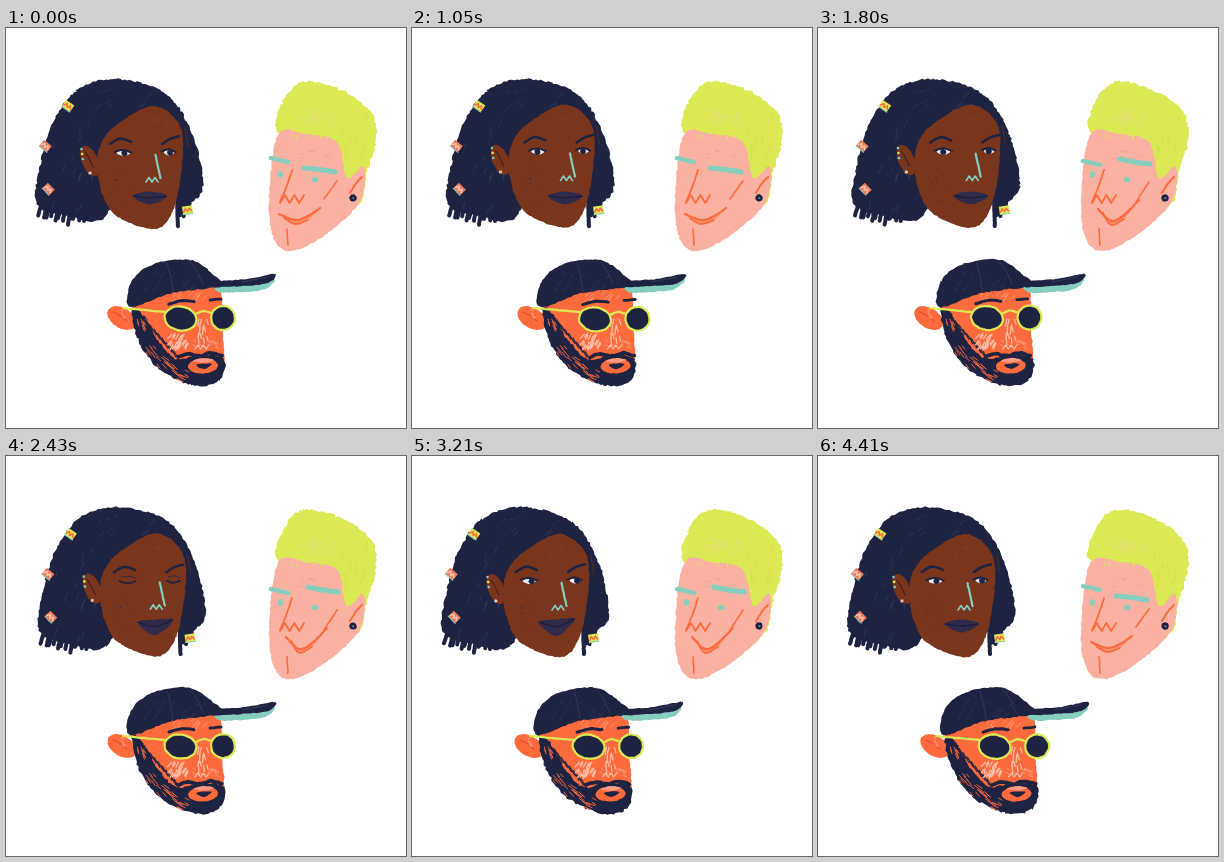
Recreate the animation shown at these times as an HTML page with a canvas. Size 400x400 px, loop 4500 ms.

```html
<!DOCTYPE html>
<html lang="en">
<head>
<meta charset="utf-8">
<title>Three portraits</title>
<style>
html, body { margin: 0; width: 100%; height: 100%; overflow: hidden; background: #fff; }
canvas { display: block; width: 400px; height: 400px; }
</style>
</head>
<body>
<canvas id="stage" width="400" height="400"></canvas>
<script>
const ctx = document.getElementById('stage').getContext('2d');
const LOOP = 4500, STEP = 30, BOIL = 125;
const navy = '#1f2342', brown = '#79361c', lip = '#302b4a', teal = '#85cdbd',
      lime = '#dbe955', pink = '#fbb1a2', orange = '#fd6a3c', blush = '#ffbda6',
      sheen = '#3b4463', rust = '#6a2c18';

let seed = 1, boil = 0, shapeId = 0;
const rnd = () => {
  seed = (seed + 0x6D2B79F5) | 0;
  let x = Math.imul(seed ^ (seed >>> 15), 1 | seed);
  x ^= x + Math.imul(x ^ (x >>> 7), 61 | x);
  return ((x ^ (x >>> 14)) >>> 0) / 4294967296;
};
const spread = a => (rnd() * 2 - 1) * a;
const mix = (a, b, k) => a + (b - a) * k;

// Eased value through [time, value] stops
function key(t, ...stops) {
  const i = stops.findIndex(s => s[0] > t);
  if (i < 0) return stops[stops.length - 1][1];
  if (i === 0) return stops[0][1];
  const [t0, a] = stops[i - 1], [t1, b] = stops[i], u = (t - t0) / (t1 - t0);
  return mix(a, b, u * u * (3 - 2 * u));
}

// Smooth path through the points, with a hand-drawn wobble
function trace(p, closed, rough) {
  seed = ++shapeId * 977 + boil * 7919;
  const n = p.length, last = closed ? n : n - 1;
  const at = i => p[closed ? (i + n) % n : Math.max(0, Math.min(n - 1, i))];
  ctx.beginPath();
  for (let i = 0; i < last; i++) {
    const [a, b, c, d] = [at(i - 1), at(i), at(i + 1), at(i + 2)];
    const m = Math.max(2, Math.round(Math.hypot(c[0] - b[0], c[1] - b[1]) / 2.5));
    for (let j = 0; j <= m; j++) {
      const u = j / m;
      const f = k => 0.5 * (2 * b[k] + (c[k] - a[k]) * u +
        (2 * a[k] - 5 * b[k] + 4 * c[k] - d[k]) * u * u +
        (3 * b[k] - a[k] - 3 * c[k] + d[k]) * u * u * u);
      ctx.lineTo(f(0) + spread(rough), f(1) + spread(rough));
    }
  }
  if (closed) ctx.closePath();
}
function fill(p, color, rough = 0.6) {
  trace(p, true, rough);
  ctx.fillStyle = color;
  ctx.fill();
}
function line(p, color, width = 2, rough = 0.2) {
  trace(p, false, rough);
  ctx.strokeStyle = color;
  ctx.lineWidth = width;
  ctx.stroke();
}
// Arc between two ends; bend pushes the middle down
const curve = (x0, y0, x1, y1, bend, color, width) =>
  line([[x0, y0], [(x0 + x1) / 2, (y0 + y1) / 2 + bend], [x1, y1]], color, width);
// Almond between two corners
const leaf = (x0, y0, x1, y1, up, down, color) => {
  const x = (x0 + x1) / 2, y = (y0 + y1) / 2;
  fill([[x0, y0], [x, y - up], [x1, y1], [x, y + down]], color, 0.3);
};
function oval(x, y, rx, ry, tilt, color) {
  const p = [];
  for (let a = 0; a < 6.2; a += Math.PI / 6) {
    const u = rx * Math.cos(a), v = ry * Math.sin(a);
    p.push([x + u * Math.cos(tilt) - v * Math.sin(tilt), y + u * Math.sin(tilt) + v * Math.cos(tilt)]);
  }
  fill(p, color, 0.3);
}
const dot = (x, y, r, color) => oval(x, y, r, r, 0, color);
function zigzag(x, y, w, h, n, color, width) {
  ctx.beginPath();
  for (let i = 0; i <= n; i++) ctx.lineTo(x + w * i / n, y - (i % 2) * h);
  ctx.strokeStyle = color;
  ctx.lineWidth = width;
  ctx.stroke();
}
function shift(dx, dy, draw) {
  ctx.save();
  ctx.translate(dx, dy);
  draw();
  ctx.restore();
}

// Crayon marks scattered in a box, all leaning along one angle
function hatch(x, y, w, h, n, len, angle, color, width) {
  seed = Math.round(x * 131 + y * 17);
  ctx.strokeStyle = color;
  ctx.lineWidth = width;
  ctx.beginPath();
  for (let i = 0; i < n; i++) {
    const px = x + rnd() * w, py = y + rnd() * h;
    const a = angle + spread(0.25), l = len * (0.4 + rnd() * 0.6);
    ctx.moveTo(px, py);
    ctx.lineTo(px + Math.cos(a) * l, py + Math.sin(a) * l);
  }
  ctx.stroke();
}

function hairClip(x, y, angle, base, mark) {
  ctx.save();
  ctx.translate(x, y);
  ctx.rotate(angle);
  ctx.fillStyle = base;
  ctx.fillRect(-5, -4, 10, 8);
  zigzag(-4, 1.5, 8, 3, 4, mark, 1.6);
  curve(-5, 4, 5, 4, 0, teal, 1);
  ctx.restore();
}

function womanEye(x, y, w, look, shut) {
  if (shut) {
    curve(x - w, y + 1, x + w, y + 1, 2, navy, 1.8);
    curve(x - w + 2, y - 3, x + w, y - 2, -1.5, lip, 1);
    return;
  }
  leaf(x - w + 1, y, x + w - 1, y, 3, 3, '#f4efec');
  dot(x + look, y + 0.3, 3, navy);
  curve(x - w - 1, y - 1, x + w, y - 0.5, -2.4, navy, 2);
}

function woman(t) {
  const turn = key(t, [690, 0], [1020, 1], [2250, 0.95], [2430, 0.5], [2700, 0]);
  const smile = key(t, [2280, 0], [2430, 0.8], [2600, 1], [3420, 1], [3600, 0]);
  const shut = t >= 2340 && t < 2550;

  shift(5 * turn, 0, () => {
    fill([[110, 51], [70, 63], [46, 97], [34, 138], [31, 176], [62, 188], [98, 190], [125, 140],
          [165, 140], [172, 188], [186, 174], [197, 158], [187, 108], [160, 66]], navy, 0.9);
    for (let i = 0; i < 17; i++) {
      seed = 300 + i * 71;
      const x = 36 + i * 3.8, end = 185 + Math.min(8, i * 1.2) + spread(4);
      curve(x + 5, 160, x - 2 + spread(2), end, 0, navy, 4);
    }
    for (let i = 0; i < 5; i++) curve(170 + i * 5, 140, 172 + i * 5.6, 198 - i * 10, 0, navy, 4);
    for (let i = 0; i < 7; i++) curve(58 - i * 3.2, 84 + i * 12, 47 - i * 2.6, 98 + i * 12, 0, navy, 4);
    hatch(45, 90, 45, 90, 20, 10, 1.9, sheen, 0.5);
    hatch(75, 58, 75, 25, 10, 9, 2.6, sheen, 0.5);
    hairClip(62, 78, 0.6, lime, orange);
    hairClip(39.5, 118, 0.7, '#f0795c', '#f7c3ae');
    hairClip(42.5, 161, 0.8, '#f0795c', '#f7c3ae');
    hairClip(181.5, 182, -0.15, lime, orange);
  });

  shift(4.5 * turn, -turn, () => {
    oval(84, 133, 8, 16, -0.4, brown);
    curve(79, 124, 87, 139, -1, '#4a2021', 1.3);
    for (let i = 0; i < 3; i++) dot(75.5 + i * 0.6, 121 + i * 5, 1.3, i % 2 ? lime : teal);
    dot(84, 145, 1.6, '#e9c4ac');
  });
  shift(5.5 * turn, -1.5 * turn, () => {
    fill([[149, 78], [119, 91], [98, 110], [91, 136], [97, 168], [112, 189], [149, 201],
          [167, 182], [176, 138], [174, 98]], brown, 0.5);
    hatch(104, 130, 20, 50, 7, 6, 0.5, rust, 0.7);
    hatch(130, 90, 35, 16, 6, 6, 2.4, '#8b452a', 0.7);
    curve(179, 100, 182, 118, 0, rust, 0.8);
  });

  shift(8.5 * turn, -1.5 * turn, () => {
    const by = shut ? 1 : 0;
    const look = 1 + key(t, [690, 0], [1020, -1.5], [2310, -1.5], [2600, 1], [3420, 1], [3600, 0]);
    curve(104, 116 + by, 125, 114 + by, -4.5, navy, 2.5);
    curve(156, 116 + by, 173, 108.5 + by, -1.5, navy, 2.5);
    womanEye(117.5, 125, 8, look, shut);
    womanEye(163, 124.5, 6.5, look, shut);
    curve(149.5, 127, 154.5, 150, 0, teal, 2.2);
    zigzag(140, 154, 12, 4.5, 4, teal, 1.6);
    dot(110, 152, 0.9, lip);
  });
  shift(9.5 * turn, 0, () => {
    const x0 = 126.5, x1 = 161 + 2 * smile, y0 = 168 - 2 * smile, y1 = 168 - 5 * smile;
    leaf(x0, y0, x1, y1, 4.5 - 3.5 * smile, 8.5 + 7 * smile, lip);
    curve(x0 + 1, y0, x1 - 1, y1, 2 + 4 * smile, '#171a35', 1.1);
  });
}

function blond(t) {
  const mood = key(t, [1080, 0], [1300, 1], [3420, 1], [3630, 0]);
  const shut = t >= 990 && t < 1140;
  const m = (a, b) => mix(a, b, mood);

  fill([[273, 106], [276, 76], [297, 54], [335, 62], [365, 84], [370, 112], [360, 148],
        [356, 172], [343, 174], [320, 115]], lime, 1.1);
  fill([[272, 107], [300, 106], [331, 114], [341, 150], [356, 138], [359, 152], [351, 178],
        [319, 207], [287, 223], [269, 213], [263, 175]], pink);
  hatch(288, 80, 40, 16, 14, 9, 1.2, '#e7dc88', 0.9);
  hatch(335, 85, 28, 45, 10, 9, 1.6, '#cfdc46', 0.7);
  hatch(285, 103, 38, 6, 7, 4, 1.4, lime, 0.8);
  hatch(292, 122, 32, 8, 6, 6, 0.2, '#f09a8b', 0.7);

  curve(356, 149, 344, 165, -1.5, orange, 2);
  dot(347, 170, 3.7, navy);
  dot(347.3, 170.2, 0.9, '#9a98a8');

  curve(265, m(130, 133), 282, m(134, 137), 0, teal, 4.4);
  curve(m(298, 302), m(140, 131), m(329, 332), m(144, 136), m(-0.5, 0.5), teal, 5.2);
  if (!shut) {
    oval(274.5, 146.5, 2.8, 3.4, 0, teal);
    oval(309, 151.5, 3.4, 2.8, 0, teal);
  }
  curve(286, 142, 274, 174, 2, orange, 1.8);
  zigzag(274, 175, 24, 8, 5, orange, 1.8);
  curve(318, m(171, 174), 331, m(153, 154), 0, orange, 1.6);

  const smile = (inset, drop) => [
    [m(273, 280) + inset, m(186, 181) + drop], [m(289, 293), m(192, 193) + drop],
    [m(302, 306), m(188, 187) + drop], [m(314, 321) - inset, m(180, 172) + drop * 1.4]];
  const top = smile(0, 0), low = smile(5, 4);
  ctx.globalAlpha = 0.45;
  fill([...top, ...low.slice().reverse()], orange, 0.2);
  ctx.globalAlpha = 1;
  line(top, orange, 2.2);
  line(low.slice(0, 3), orange, 1.7);
  curve(281, 201, 282, 217, 0, orange, 1.6);
}

function lens(x, y, rx) {
  oval(x, y, rx, 12, 0.15, navy);
  ctx.strokeStyle = lime;
  ctx.lineWidth = 2.2;
  ctx.stroke();
}

function capMan(t) {
  const v = key(t, [0, 0], [690, 0.08], [1020, 1], [1290, 1], [1680, -0.65], [2220, -0.65],
                [2430, 0], [2790, 0], [3090, 0.25], [4410, 0.25], [4500, 0]);
  const ear = (v < 0 ? 8 : 4) * v, front = 8.5 * v;

  shift(ear, 0, () => {
    oval(116, 290, 16, 10, 0.55, orange);
    curve(107, 284, 121, 293, -1, '#e4502d', 1.2);
    hatch(107, 281, 12, 12, 4, 5, 0.7, blush, 0.7);
  });
  shift(4.8 * v, 0, () => {
    fill([[128, 272], [170, 258], [211, 255], [216, 298], [217, 342], [198, 356], [155, 335], [133, 305]], orange);
    fill([[126, 281], [132, 311], [152, 340], [186, 357], [213, 353], [218, 331], [194, 327],
          [171, 331], [152, 313], [137, 287]], navy, 1);
    // orange gaps follow the jaw
    for (let i = 0; i < 5; i++) {
      const u = i / 4;
      hatch(130 + 40 * u, 288 + 54 * Math.sqrt(u), 11, 10, 8, 9, 1.15 - 0.7 * u, orange, 0.9);
    }
    // loose whiskers on the cheek
    for (let i = 0; i < 9; i++) curve(136 + i * 4, 288 + i * 4.4, 142 + i * 4, 298 + i * 4.4, 0, navy, 1.2);
  });

  shift(6.5 * v, 0, () => {
    hatch(165, 304, 17, 15, 34, 6, 2.1, blush, 1.4);
    hatch(192, 290, 9, 22, 14, 8, 1.5, blush, 1.3);
    hatch(168, 263, 38, 8, 14, 6, 2.3, '#ff9b78', 1);
    hatch(186, 312, 24, 8, 10, 6, 0.6, '#ff9b78', 1);
    zigzag(189, 321, 14, 4, 5, blush, 1.3);
    oval(197, 338, 15, 7.5, -0.05, orange);
    leaf(187, 333, 208, 332, 2.5, 2, '#ff9b86');
    leaf(190, 337, 206, 336, 1, 4.5, navy);
    line([[172, 329], [182, 326], [194, 328], [205, 325], [216, 328]], navy, 3.6, 0.6);
  });

  shift(8 * v, 0.5 * v, () => {
    curve(163, 276, 188, 273.5, -2, navy, 3);
    curve(204, 272, 215, 271, 0, navy, 2.8);
  });
  curve(117 + ear, 280, 159 + front, 284, 0, lime, 2.2);
  shift(front, 0.8 * v, () => {
    lens(174.5, 290.5, 16);
    lens(217, 290, 12);
    curve(190, 286, 205, 285, -2.5, lime, 2.2);
  });

  shift(4 * v, 0, () => {
    fill([[211, 256], [240, 256], [268, 251], [259, 261], [236, 264], [212, 264]], teal, 0.5);
    fill([[124, 279], [126, 253], [148, 236], [184, 232], [208, 247], [214, 258], [166, 265]], navy);
    fill([[205, 254], [240, 251], [269, 246], [262, 255], [236, 258], [205, 259]], navy, 0.4);
    curve(161, 235, 167, 263, -3, sheen, 0.7);
    curve(184, 234, 197, 257, -3, sheen, 0.7);
    curve(236, 254, 262, 249, 0, sheen, 0.7);
    hatch(132, 244, 65, 18, 14, 7, 2.2, sheen, 0.5);
  });
}

function draw(t) {
  boil = Math.floor(t / BOIL) % 4;
  shapeId = 0;
  ctx.fillStyle = '#fff';
  ctx.fillRect(0, 0, 400, 400);
  ctx.lineCap = ctx.lineJoin = 'round';
  woman(t);
  blond(t);
  capMan(t);
}

const start = performance.now();
function tick() {
  const t = (performance.now() - start) % LOOP;
  draw(Math.floor(t / STEP) * STEP);
  requestAnimationFrame(tick);
}
tick();
</script>
</body>
</html>
```
